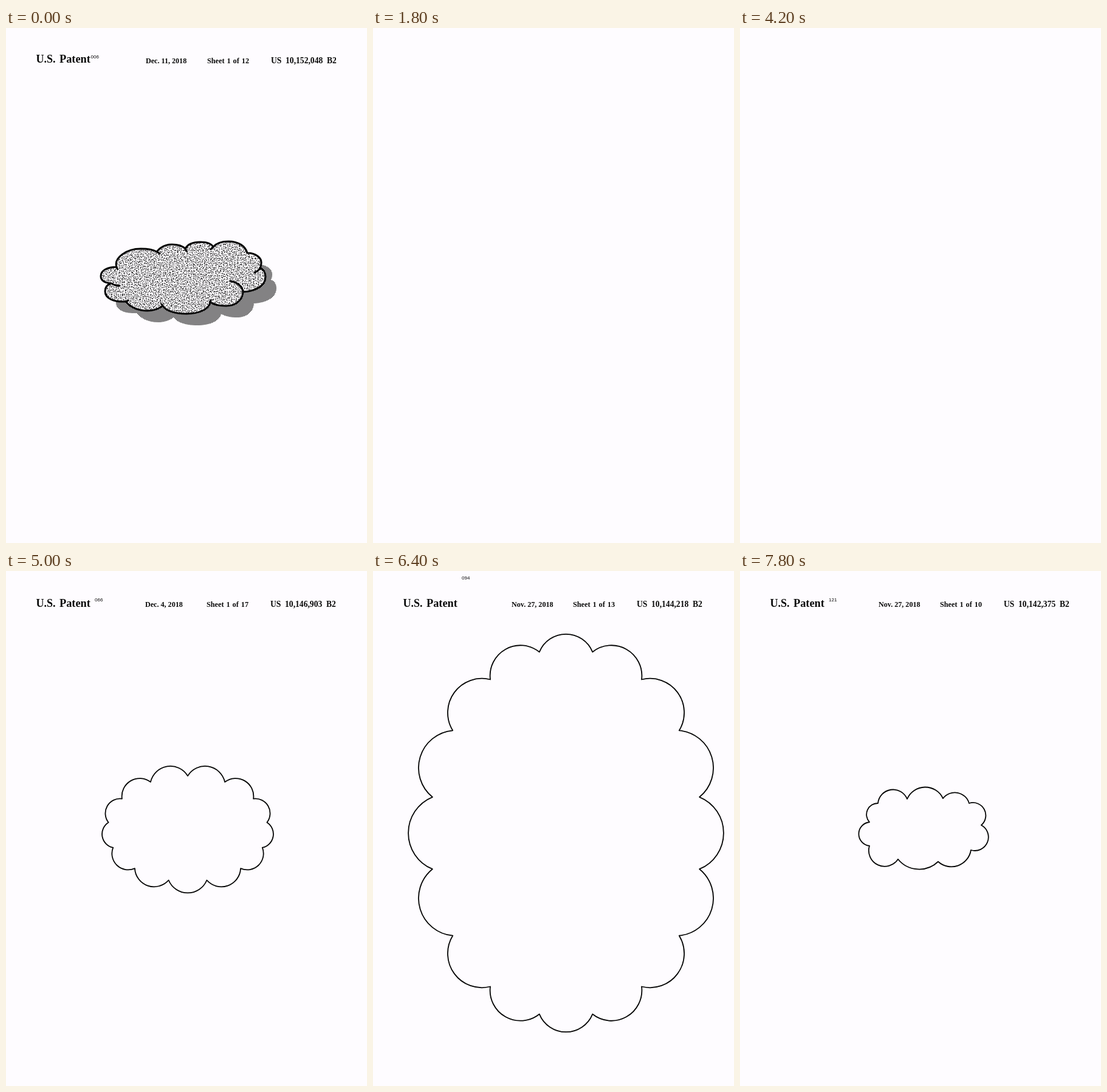
These frames come from a looping animation (594x847 px, 8000 ms). An HTML page:

```html
<!DOCTYPE html>
<html lang="en">
<head>
<meta charset="utf-8">
<title>Cloud sheets</title>
<style>
html, body { margin: 0; width: 100%; height: 100%; overflow: hidden; background: #fefcff; }
svg { display: block; width: 594px; height: 847px; }
text { fill: #0a0a0a; white-space: pre; }
.head { font-family: "Liberation Serif", "Times New Roman", serif; font-weight: bold; }
.index { font: 8px "Liberation Sans", Arial, sans-serif; }
.line { fill: none; stroke: #050505; stroke-linejoin: round; stroke-linecap: round; }
</style>
</head>
<body>
<svg id="stage" viewBox="0 0 594 847">
  <defs>
    <pattern id="hatch" width="2" height="2" patternUnits="userSpaceOnUse">
      <path d="M0 0h1v1h-1zM1 1h1v1h-1z" fill="#080808" shape-rendering="crispEdges"/>
    </pattern>
    <clipPath id="inside"><path id="clipShape"/></clipPath>
  </defs>
  <g id="page"></g>
</svg>
<script>
const LOOP = 8000;
const page = document.getElementById('page');

const puffy = 'M182 393C177 378 198 363 222 363C234 363 243 365 248 368' +
  'C255 359 264 356 273 356C284 356 291 359 295 363' +
  'C299 355 309 352 320 352C331 352 338 355 341 360' +
  'C346 354 355 351 366 351C383 351 394 359 397 370' +
  'C412 370 421 379 420 387C420 390 419 393 418 395' +
  'C424 397 427 403 427 409C427 424 411 433 390 434' +
  'C389 449 377 457 362 457C352 457 342 455 336 451' +
  'C334 463 317 470 297 470C276 470 262 464 258 457' +
  'C251 462 242 465 233 465C214 465 204 458 197 450' +
  'C178 451 163 445 163 433C163 426 167 422 173 420' +
  'C161 419 156 414 156 408C156 398 168 393 182 393Z';
const hooks = 'M248 368L253 371M295 363L297 367M341 360L337 364' +
  'M418 395Q415 400 409 402M390 434Q388 420 369 416M336 451L337 448' +
  'M258 457L256 454M173 420Q180 424 187 424M182 393L183 396M197 450L201 448';
document.getElementById('clipShape').setAttribute('d', puffy);

function random(seed) {
  return () => (seed = (seed * 16807) % 2147483647) / 2147483647;
}

// Evenly scattered specks: one per grid cell, nudged at random.
function specks(x0, y0, x1, y1, step) {
  const rnd = random(71);
  let d = '';
  for (let y = y0; y < y1; y += step)
    for (let x = x0; x < x1; x += step) {
      const px = x + rnd() * step * 0.8, py = y + rnd() * step * 0.8;
      d += `M${px.toFixed(1)} ${py.toFixed(1)}h1.3v1.3h-1.3z`;
    }
  return d;
}

const line = (d, width) => `<path class="line" d="${d}" stroke-width="${width}"/>`;

const shaded = `<path d="${puffy}" transform="translate(18 19)" fill="url(#hatch)"/>` +
  `<path d="${puffy}" fill="#fefcff"/>` +
  `<path d="${specks(155, 350, 430, 472, 2.6)}" fill="#080808" clip-path="url(#inside)"/>` +
  line(puffy + hooks, 3);

// Each entry is the arc's radius and its end point.
function arcs(x, y, list) {
  return `M${x} ${y}` + list.map(([r, ax, ay]) => `A${r} ${r} 0 0 1 ${ax} ${ay}`).join('') + 'Z';
}

const round = line(arcs(213, 413, [
  [18.5, 227, 382], [25, 275, 375], [32.4, 334, 374], [24.5, 377, 382], [21, 397, 418],
  [22.3, 380, 459], [32.6, 326, 478], [45, 260, 474], [26.2, 213, 452], [19.6, 213, 413]
]), 1.8);

// A ring of lobes that fills the given box.
function ring(left, top, right, bottom, lobes, width) {
  const cx = (left + right) / 2, cy = (top + bottom) / 2;
  const rx = (right - left) / 2 * 0.87, ry = (bottom - top) / 2 * 0.87;
  const at = i => {
    const a = (i + 0.5) / lobes * Math.PI * 2 + Math.PI / 2;
    return [cx + rx * Math.cos(a), cy + ry * Math.sin(a)];
  };
  const list = [];
  for (let i = 1; i <= lobes; i++) {
    const [x, y] = at(i), [px, py] = at(i - 1);
    list.push([Math.hypot(x - px, y - py) * 0.54, x, y].map(v => +v.toFixed(1)));
  }
  return line(arcs(...at(0), list), width);
}

const wide = ring(176, 349, 424, 498, 12, 1.8);
const tall = ring(150, 324, 448, 523, 11, 1.8);
const small = ring(200, 361, 404, 486, 10, 1.8);
const plain = ring(182, 351, 420, 496, 11, 1.8);
const bold = ring(186, 352, 414, 495, 9, 2.4);
const broad = ring(148, 324, 450, 524, 13, 1.8);
const soft = ring(178, 346, 422, 501, 10, 1.8);
const full = ring(60, 82, 575, 780, 16, 1.8);
const high = ring(156, 329, 444, 518, 12, 1.8);

const text = (cls, x, y, size, str, gap = 0) =>
  `<text class="${cls}" x="${x}" y="${y}" style="font-size:${size}px;word-spacing:${gap}px">${str}</text>`;

function sheet(art, index, date, count, number, opt = {}) {
  const { dx = -2, y = 59, ix = 146, iy = 50 } = opt;
  return text('head', 49.5, y - 0.5, 18, 'U.S.') +
    text('head', 88, y - 0.5, 18.3, 'Patent') +
    text('index', ix, iy, 8, index) +
    text('head', 230 + dx, y, 12.1, date) +
    text('head', 331 + dx, y, 12.2, `Sheet 1 of ${count}`, 1) +
    text('head', 436 + dx, y, 13.6, `US ${number} B2`, 3.3) + art;
}

const timeline = [
  [0, sheet(shaded, '006', 'Dec. 11, 2018', 12, '10,152,048', { dx: 0, y: 57.5, ix: 139.5 })],
  [800, sheet(wide, '014', 'Dec. 11, 2018', 14, '10,152,211', { dx: -1, y: 58 })],
  [1800, ''],
  [2000, sheet(tall, '023', 'Dec. 11, 2018', 11, '10,151,386')],
  [2200, sheet(tall, '024', 'Dec. 11, 2018', 18, '10,151,397')],
  [2600, sheet(small, '031', 'Dec. 11, 2018', 16, '10,150,842')],
  [2800, sheet(small, '038', 'Dec. 11, 2018', 10, '10,150,615')],
  [3200, ''],
  [3400, sheet(plain, '045', 'Dec. 4, 2018', 15, '10,148,730')],
  [3600, sheet(plain, '046', 'Dec. 4, 2018', 13, '10,148,724')],
  [4200, ''],
  [4400, sheet(bold, '057', 'Dec. 4, 2018', 12, '10,147,561', { dx: -1 })],
  [4600, sheet(bold, '058', 'Dec. 4, 2018', 19, '10,147,558', { dx: -1 })],
  [5000, sheet(broad, '066', 'Dec. 4, 2018', 17, '10,146,903', { dx: -1 })],
  [5200, sheet(broad, '069', 'Dec. 4, 2018', 14, '10,146,872', { dx: -1 })],
  [5600, ''],
  [5800, sheet(soft, '081', 'Dec. 4, 2018', 11, '10,145,439')],
  [6000, sheet(soft, '082', 'Dec. 4, 2018', 16, '10,145,426')],
  [6400, sheet(full, '094', 'Nov. 27, 2018', 13, '10,144,218', { iy: 14 })],
  [6600, sheet(full, '095', 'Nov. 27, 2018', 15, '10,144,207', { iy: 14 })],
  [7000, ''],
  [7200, sheet(high, '108', 'Nov. 27, 2018', 12, '10,143,164', { dx: -1, iy: 8 })],
  [7400, sheet(high, '109', 'Nov. 27, 2018', 18, '10,143,159', { dx: -1, iy: 8 })],
  [7600, ''],
  [7800, sheet(round, '121', 'Nov. 27, 2018', 10, '10,142,375')]
];

let shown = -1;
function draw(time) {
  const now = time % LOOP;
  let i = timeline.length - 1;
  while (timeline[i][0] > now) i--;
  if (i !== shown) page.innerHTML = timeline[shown = i][1];
}

const start = performance.now();
function tick() {
  draw(performance.now() - start);
  requestAnimationFrame(tick);
}
tick();
</script>
</body>
</html>
```
